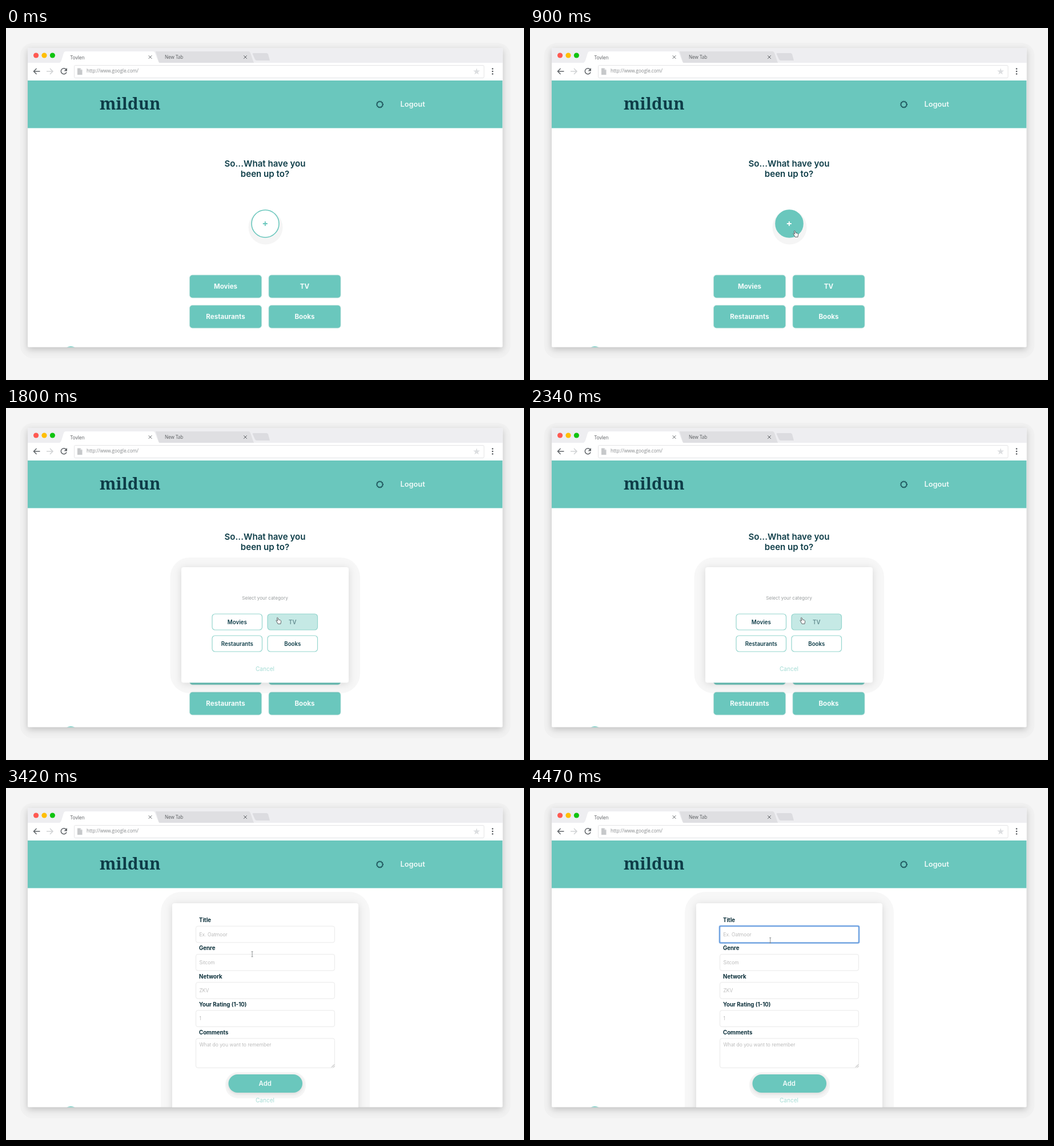
Animation, 907 px wide and 617 px high, one loop 4500 ms. Source, as an HTML page:

```html
<!DOCTYPE html>
<html lang="en">
<head>
<meta charset="utf-8">
<title>Diary app walkthrough</title>
<style>
  html, body { margin: 0; width: 100%; height: 100%; overflow: hidden; background: #f5f5f5; }
  svg { display: block; font-family: Inter, sans-serif; }
  .chrome { font-family: "Open Sans", sans-serif; }
  .wordmark { font-family: "Noto Serif", serif; }
  .window { filter: drop-shadow(0 4px 6px rgba(0, 0, 0, .2)); }
  .card { filter: drop-shadow(0 2px 7px rgba(0, 0, 0, .13)); }
  .pill { filter: drop-shadow(0 2px 3px rgba(0, 0, 0, .12)); }
</style>
</head>
<body>
<svg id="stage" width="907" height="617" viewBox="0 0 907 617"></svg>
<script>
const TEAL = '#6ac7bd', INK = '#0e3d48', PALE = '#a5dcd5', HINT = '#a9a9a9';
const LOOP = 4500, MODAL_AT = 1110, FORM_AT = 2550, FOCUS_AT = 3720;

const rect = (x, y, w, h, r, attrs) =>
  `<rect x="${x}" y="${y}" width="${w}" height="${h}" rx="${r}" ${attrs}/>`;
const circle = (x, y, r, attrs) => `<circle cx="${x}" cy="${y}" r="${r}" ${attrs}/>`;
const path = (d, attrs) => `<path d="${d}" ${attrs}/>`;
const line = (d, color, width = 1.3) =>
  path(d, `fill="none" stroke="${color}" stroke-width="${width}"`);
const group = (id, content, attrs = '') => `<g id="${id}" ${attrs}>${content}</g>`;

// y is the middle of the capital letters
const text = (s, x, y, size, color, weight = 400, anchor = 'start', attrs = '') =>
  `<text x="${x}" y="${y + size * .36}" font-size="${size}" fill="${color}"
    font-weight="${weight}" text-anchor="${anchor}" ${attrs}>${s}</text>`;
const centered = (s, x, y, size, color, weight) => text(s, x, y, size, color, weight, 'middle');

function browser() {
  const lights = ['#ff5a52', '#ffbe04', '#0fc410']
    .map((c, i) => circle(52.6 + i * 14.4, 48, 4.6, `fill="${c}"`)).join('');
  const close = x => line(`M${x - 2.8} 48.2l5.6 5.6m0-5.6l-5.6 5.6`, '#5c6064', 1);
  const arrow = (x, dir, color) =>
    line(`M${x} 76h${11 * dir}M${x + 5 * dir} 71l${-5 * dir} 5l${5 * dir} 5`, color, 1.5);
  const dots = [71.5, 76, 80.5].map(y => circle(852, y, 1.3, 'fill="#55595d"')).join('');
  const star = Array.from({ length: 10 }, (_, i) => {
    const a = i * Math.PI / 5, r = i % 2 ? 2.6 : 6.3;
    return `${824 + r * Math.sin(a)},${76.5 - r * Math.cos(a)}`;
  }).join(' ');
  return rect(38, 35, 831.5, 40, 2, 'fill="#eeeef1"') +
    rect(38, 61, 831.5, 31, 0, 'fill="#fff"') + lights +
    path('M262 41H424Q427 41 428 44L434 61H268Z', 'fill="#dfdfe2"') +
    path('M433 44H456Q458 44 459 46L462 57H439Q437 57 436 55L432 46Q431 44 433 44Z', 'fill="#dcdce0"') +
    path('M93 61.5Q96 60 97 57L101 44Q102 41 105 41H257Q260 41 261 44L266 57Q267 60 269 61.5Z', 'fill="#fff"') +
    text('Tovlen', 112.5, 51.5, 8.4, '#5a5d60') + close(252.5) +
    text('New Tab', 278, 51.5, 8.1, '#5a5d60') + close(419) +
    arrow(48.5, 1, '#5f6468') + arrow(82, -1, '#d0d2d4') +
    line('M105.5 73A5 5 0 1 0 106 77.5', '#5f6468', 1.5) +
    path('M107 70V75.5H101.5Z', 'fill="#5f6468"') +
    rect(119.5, 65.5, 717.5, 22, 2, 'fill="#fff" stroke="#e4e4e6"') +
    path('M125 70.5H130.5L133.5 73.5V82H125Z', 'fill="#c6c8ca"') +
    path('M130.5 70.5V73.5H133.5Z', 'fill="#eee"') +
    text('http://www.google.com/', 141, 75.5, 8.1, '#85888b') +
    `<polygon points="${star}" fill="#dcdee0"/>` + dots;
}

function header() {
  return rect(38, 92, 831.5, 83.5, 0, `fill="${TEAL}"`) +
    text('mildun', 164, 132.5, 29, INK, 900, 'start', 'class="wordmark"') +
    circle(654.5, 134, 4.8, `fill="none" stroke="${INK}" stroke-width="1.1"`) +
    circle(654.5, 134, 5.8, `fill="none" stroke="${INK}" stroke-width="1.4" stroke-dasharray="1.3 1.3"`) +
    text('Logout', 690.5, 133.5, 12.8, '#f0faf8', 600);
}

function home() {
  const button = (label, x, y) =>
    rect(x, y, 126, 40, 5, `fill="${TEAL}" stroke="#b9dfda" stroke-width=".8"`) +
    centered(label, x + 63, y + 19.7, 11.6, '#f5fcfb', 700);
  return group('question',
      centered('So...What have you', 453.5, 238, 15.1, INK, 600) +
      centered('been up to?', 453.5, 256, 15.1, INK, 600)) +
    group('plus',
      circle(454.5, 349.5, 30, 'fill="#f5f5f5"') +
      circle(454, 343, 24, `id="plusDisc" stroke="${TEAL}" stroke-width="1.6"`) +
      path('M449.8 343h8M453.8 339v8', 'id="plusSign" stroke-width="1.8"')) +
    group('buttons',
      button('Movies', 321.5, 433) + button('TV', 460, 433) +
      button('Restaurants', 321.5, 486) + button('Books', 460, 486));
}

function categoryCard() {
  const option = (label, x, y, id = '') =>
    `<g id="${id || label}">` +
    rect(x, y, 87.5, 28, 5, 'fill="#fff" stroke="#94d5cd" stroke-width="1.2"') +
    centered(label, x + 43.8, y + 14.2, 9.7, INK, 600) + '</g>';
  return rect(287.5, 262, 332.5, 238, 34, 'fill="#000" fill-opacity=".032"') +
    rect(307, 279, 293, 202.5, 4, 'fill="#fff" class="card"') +
    centered('Select your category', 453.5, 333.3, 8.2, '#9b9fa0', 400) +
    option('Movies', 361, 361) + option('TV', 458, 361, 'tv') +
    option('Restaurants', 361, 399) + option('Books', 458, 399) +
    centered('Cancel', 453.5, 457.7, 10.1, PALE, 400);
}

function entryForm() {
  const fields = [['Title', 'Ex. Oatmoor'], ['Genre', 'Sitcom'], ['Network', 'ZKV'],
    ['Your Rating (1-10)', '1'], ['Comments', 'What do you want to remember']];
  const rows = fields.map(([label, hint], i) => {
    const y = 231.7 + i * 49.2, last = i === 4;
    return text(label, 338, y, 9.7, '#0b2f3a', 700) +
      rect(332.5, y + 10.5, 243, last ? 51.5 : 28.7, 3.5, 'fill="#fff" stroke="#e9e9e9"') +
      text(hint, 338.5, y + (last ? 21 : 25), 8.6, HINT, 300);
  }).join('');
  return rect(271, 182, 366, 420, 36, 'fill="#000" fill-opacity=".032"') +
    rect(291, 202, 326, 400, 4, 'fill="#fff" class="card"') + rows +
    line('M570 489.5l5-5M573 489.5l2-2', '#888', .8) +
    rect(384, 498, 141, 46, 22, 'fill="#f6f6f6"') +
    rect(389.5, 502, 129.5, 32, 16, `fill="${TEAL}" class="pill"`) +
    centered('Add', 453.7, 518, 11.4, '#f2fbfa', 600) +
    centered('Cancel', 453.5, 547.7, 10.1, PALE, 400) +
    group('focus',
      rect(332, 242, 244, 29.5, 2, 'fill="none" stroke="#73a5e2" stroke-width="2.6"') +
      path('M339.5 252v10', 'id="caret" stroke="#444" stroke-width=".9"'));
}

const cursors =
  group('arrow', path('M0 0V11L2.6 8.6L4.4 12.4L6 11.6L4.3 8H7.6Z',
    'fill="#222" stroke="#fff" stroke-width=".8"')) +
  group('hand', path('M-2.6-4.6Q-1.6-5.8-.7-4.4L.3-1.4L3.4-.6Q4.8 0 4.6 1.8L3.9 5.8H-1L-4-.1Q-3.6-1.4-2.2-.2L-1.2.8Z',
    'fill="#fff" stroke="#4a4f52" stroke-width=".9" stroke-linejoin="round"')) +
  group('beam', line('M-1.5-4.5h3M0-4.5v9M-1.5 4.5h3', '#85898c', .9));

const $ = id => document.getElementById(id);
$('stage').innerHTML =
  '<clipPath id="view"><rect x="38" y="92" width="831.5" height="467.5"/></clipPath>' +
  rect(24.5, 26, 859, 553, 23, 'fill="#f1f1f1"') +
  rect(38, 35, 831.5, 524.5, 2, 'fill="#fff" class="window"') +
  group('browser', browser(), 'class="chrome"') +
  group('page', header() + circle(113.5, 572, 14, `fill="${TEAL}"`) +
    group('home', home()) + group('category', categoryCard()) +
    group('form', entryForm()) + group('cursor', cursors), 'clip-path="url(#view)"');

// pointer stops: time, x, y
const route = [[520, 640, 570], [810, 465, 360.5], [1300, 465, 360.5], [1600, 477, 372.5],
  [2580, 477, 372.5], [2760, 435, 300.5], [3300, 435, 300.5], [3650, 420.7, 267]];

function pointer(t) {
  const next = route.findIndex(stop => stop[0] > t);
  if (next < 1) return route[next < 0 ? route.length - 1 : 0].slice(1);
  const [t0, x0, y0] = route[next - 1], [t1, x1, y1] = route[next];
  const p = (t - t0) / (t1 - t0), k = p * p * (3 - 2 * p);
  return [x0 + (x1 - x0) * k, y0 + (y1 - y0) * k];
}

const show = (id, on) => $(id).setAttribute('display', on ? 'inline' : 'none');

function draw(t) {
  const [x, y] = pointer(t);
  const modal = t >= MODAL_AT && t < FORM_AT, form = t >= FORM_AT;
  const overPlus = t < MODAL_AT && Math.hypot(x - 454, y - 343) < 25;
  const overTv = modal && x > 458 && y > 364;
  const shift = modal ? 12 : 0;

  show('home', !form);
  show('plus', !modal);
  show('category', modal);
  show('form', form);
  $('question').setAttribute('transform', `translate(0 ${-shift})`);
  $('buttons').setAttribute('transform', `translate(0 ${shift})`);
  $('plusDisc').setAttribute('fill', overPlus ? TEAL : '#fff');
  $('plusSign').setAttribute('stroke', overPlus ? '#fff' : TEAL);
  $('tv').firstChild.setAttribute('fill', overTv ? '#c5e9e5' : '#fff');
  $('tv').lastChild.setAttribute('fill', overTv ? '#668f92' : INK);

  show('focus', t >= FOCUS_AT);
  show('caret', (t - FOCUS_AT) % 1000 < 500);
  show('cursor', t >= route[0][0]);
  $('cursor').setAttribute('transform', `translate(${x} ${y})`);
  show('hand', overPlus || modal);
  show('beam', form);
  show('arrow', !overPlus && !modal && !form);
}

const start = performance.now();
function tick() {
  draw((performance.now() - start) % LOOP);
  requestAnimationFrame(tick);
}
tick();
</script>
</body>
</html>
```
